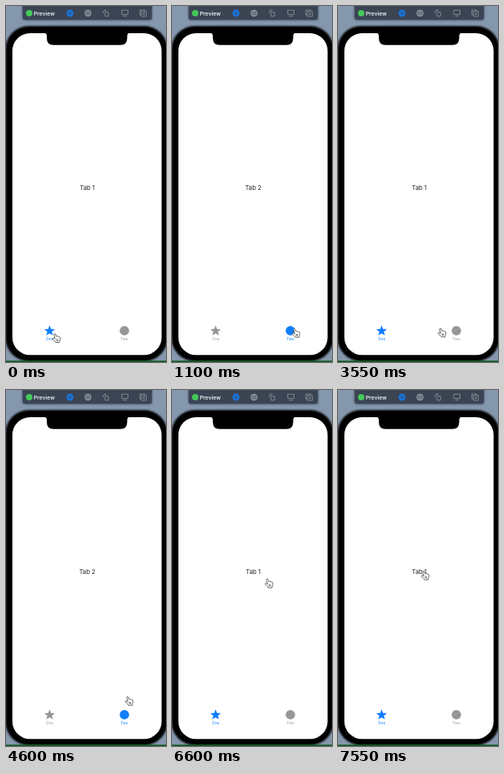
Animation of 200x445 px, one loop 8 s. Source, as an HTML page:

```html
<!DOCTYPE html>
<html lang="en">
<head>
<meta charset="utf-8">
<title>Tab view preview</title>
<style>
html, body { margin: 0; width: 100%; height: 100%; overflow: hidden; background: #8597ad; }
svg { display: block; width: 100%; height: 100%; }
text { font-family: Inter, Roboto, sans-serif; }
.tab { font-size: 4.7px; text-anchor: middle; }
.icon { fill: none; stroke: #8f98a5; stroke-width: .8; }
</style>
</head>
<body>
<svg viewBox="0 0 200 445">
  <defs>
    <filter id="soft" x="-5%" y="-5%" width="110%" height="110%"><feGaussianBlur stdDeviation=".45"/></filter>
    <filter id="glow" x="-10%" y="-10%" width="120%" height="120%"><feGaussianBlur stdDeviation="1.3"/></filter>
  </defs>
  <rect width="200" height="445" fill="#8597ad"/>

  <rect x="20" y="-4" width="163" height="22.2" rx="4" fill="#56637a" filter="url(#glow)"/>
  <g filter="url(#soft)">
    <rect x="20.8" y="-4" width="161.6" height="21.2" rx="3.5" fill="#3a4453"/>
    <circle cx="29" cy="9" r="4" fill="#43c95a"/>
    <circle cx="80" cy="9" r="4.4" fill="#1a74e0"/>
    <rect x="78.2" y="7.2" width="3.6" height="3.6" rx=".8" fill="#2a5c9c"/>
    <g class="icon" style="stroke:#cfd4da">
      <circle cx="102.5" cy="9" r="3.8"/>
      <rect x="101.2" y="6.8" width="2.6" height="4.4" rx=".8"/>
    </g>
    <g class="icon">
      <path d="M123.8 7.8h4.4v5h-4.4zM121.6 9.2V7q0-1.6 1.6-1.6h1.6M123.8 4.2l1.2 1.2-1.2 1.2"/>
      <path d="M144.7 5.2h7.8v5.4h-7.8zM146.3 12.6h4.6"/>
      <path d="M169.2 11.2h-1.8v-6.2h6v1.8M169.2 6.8h6.2v6.2h-6.2zM172.3 8.4v3M170.8 9.9h3"/>
    </g>
  </g>
  <text x="34.7" y="11.5" font-size="6.8" font-weight="600" fill="#e9ecf0">Preview</text>

  <rect x="-.6" y="25" width="202.4" height="419" rx="29" filter="url(#glow)"/>
  <g filter="url(#soft)">
    <rect x="8" y="34" width="186.5" height="402.3" rx="22" fill="#fff"/>
    <path d="M47.5 33Q51 34 51 37.5V40Q51 48.8 59.5 48.8H143Q151.5 48.8 151.5 40V37.5Q151.5 34 155 33Z"/>
  </g>
  <rect y="443.4" width="200" height="1.6" fill="#0c5a1c"/>

  <text id="title" x="101.6" y="229.6" font-size="7.7" text-anchor="middle" fill="#222"></text>
  <g id="one">
    <path id="star" filter="url(#soft)"/>
    <text class="tab" x="54.6" y="418.2">One</text>
  </g>
  <g id="two">
    <circle cx="148" cy="405.9" r="5.9" filter="url(#soft)"/>
    <text class="tab" x="148" y="418.2">Two</text>
  </g>
  <path id="hand" fill="#fff" stroke="#555" stroke-width=".9" stroke-linejoin="round"
    d="M2 1.5Q2 .3 3 .3Q3.8.3 4 1.2L4.8 3.7Q6 3 6.6 3.9Q7.7 3.3 8.3 4.3Q9.6 4 9.8 5.4Q10 8 8.9 9.3V11.2H4.1Q3.5 9.7 2 8.6L.3 7.1Q-.1 6 1 5.7Q2.2 5.7 3.3 6.8ZM5.2 7v2.6M6.7 7v2.6"/>
</svg>
<script>
const LOOP = 8000, STEP = 50;
const BLUE = '#107dfa', GREY = '#979797';
const $ = id => document.getElementById(id);

// Pointer moves: start, end, x, y. Between moves it rests.
const moves = [
  [0, 650, 150, 403],
  [1400, 1450, 140, 403],
  [1800, 2600, 52.5, 405],
  [3100, 3150, 84.5, 403.5],
  [3500, 3550, 125, 402.5],
  [3600, 4050, 145, 408],
  [4550, 4600, 149, 383],
  [4950, 5600, 105.5, 230],
  [6550, 6800, 127.5, 242],
  [6900, 7100, 135, 241],
  [7100, 7550, 104, 226]
];
const switches = [1100, 2600, 4200, 6000];

const easeOut = p => 1 - (1 - p) ** 3;

function pointer(t) {
  let x = 58, y = 409.3;
  for (const [start, end, toX, toY] of moves) {
    const p = easeOut(Math.min(1, Math.max(0, (t - start) / (end - start))));
    x += (toX - x) * p;
    y += (toY - y) * p;
  }
  return [x, y];
}

function starPath(cx, cy, r) {
  let d = '';
  for (let i = 0; i < 10; i++) {
    const a = i * Math.PI / 5, k = i % 2 ? r * .43 : r;
    d += (i ? 'L' : 'M') + (cx + k * Math.sin(a)) + ' ' + (cy - k * Math.cos(a));
  }
  return d + 'Z';
}

function draw(time) {
  const t = Math.floor(time % LOOP / STEP) * STEP;
  const second = switches.filter(s => t >= s).length % 2 === 1;
  $('title').textContent = second ? 'Tab 2' : 'Tab 1';
  $('one').setAttribute('fill', second ? GREY : BLUE);
  $('two').setAttribute('fill', second ? BLUE : GREY);
  $('hand').setAttribute('transform', `translate(${pointer(t)})`);
}

$('star').setAttribute('d', starPath(54.5, 406.2, 7));
const start = performance.now();
function tick() {
  draw(performance.now() - start);
  requestAnimationFrame(tick);
}
tick();
</script>
</body>
</html>
```
